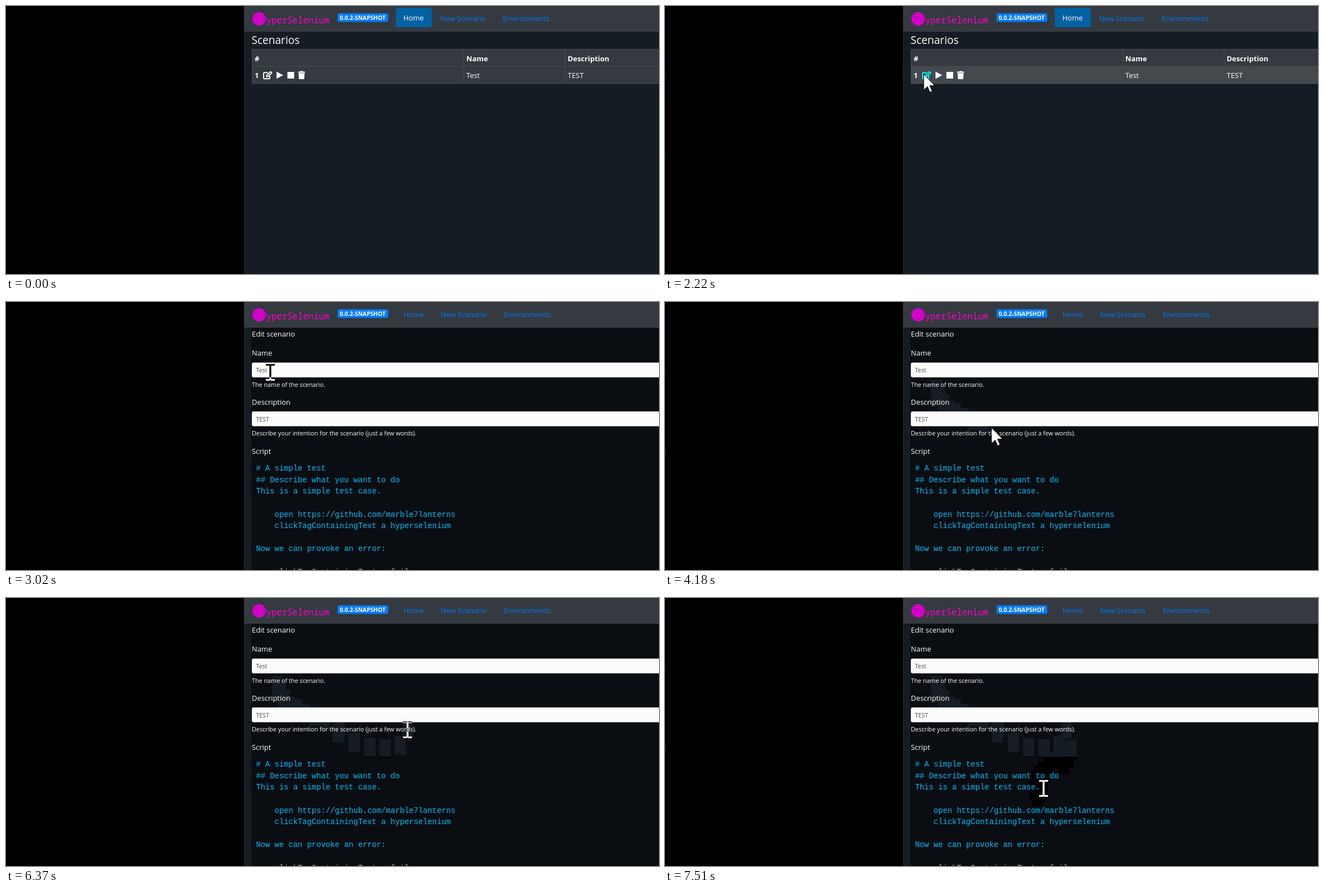
An HTML page that plays this animation: 1166x480 px, repeating every 8 s.

```html
<!DOCTYPE html>
<html lang="en">
<head>
<meta charset="utf-8">
<title>Scenario editor</title>
<style>
  html, body { margin: 0; width: 100%; height: 100%; overflow: hidden; background: #000; }
  svg { display: block; width: 100%; height: 100%; }
  text { font: 12.9px "Open Sans", "Noto Sans", sans-serif; fill: #fff; white-space: pre; }
  .bold { font-weight: 700; }
  .title { font-size: 19.1px; }
  .badge { font-size: 10.3px; font-weight: 700; }
  .brand { font: 15.7px "Noto Sans Mono", monospace; fill: #f0c; }
  .link { fill: #007bff; }
  .input { font-size: 10.6px; fill: #495057; }
  .help { font-size: 10.8px; }
  .code { font: 13.8px "Liberation Mono", monospace; fill: #00bfff; }
  .code:last-child { fill: #aab; }
  .line { stroke: #454d55; fill: none; }
  #beam { mix-blend-mode: difference; fill: #fff; }
</style>
</head>
<body>
<svg viewBox="0 0 1166 480">
  <defs>
    <!-- Pointer trail: slate over the form, black over the script area -->
    <linearGradient id="trailFill" gradientUnits="userSpaceOnUse" x1="0" y1="0" x2="0" y2="480">
      <stop offset=".592" stop-color="#161c23"/>
      <stop offset=".592" stop-color="#000"/>
    </linearGradient>
  </defs>
  <rect width="1166" height="480"/>
  <rect x="425" width="741" height="480" fill="#161c23"/>
  <path d="M0 127h1v2H0zM0 268h1v2H0z" fill="#a00c1c"/>
  <rect x="425" width="741" height="46" fill="#343a40"/>
  <path d="M425.5 46V480" stroke="#2b3035"/>
  <circle cx="452" cy="23" r="12" fill="#d400c8"/>
  <text class="brand" x="464.5" y="31">yperSelenium</text>
  <rect x="592" y="13" width="90.5" height="15.5" rx="3" fill="#007bff"/>
  <text class="badge" x="596" y="24.6">0.0.2-SNAPSHOT</text>

  <g id="list">
    <rect x="696" y="3.5" width="64.5" height="34.5" rx="3" fill="#0062a3"/>
    <text x="709.5" y="26">Home</text>
    <text class="link" x="775" y="26.5">New Scenario</text>
    <text class="link" x="887" y="26.5">Environments</text>
    <text class="title" x="438.5" y="67.5">Scenarios</text>
    <rect x="439" y="77" width="727" height="62" fill="#343a40"/>
    <rect id="row" x="439" y="108" width="727" height="31" fill="#45494d"/>
    <path class="line" d="M1166 77.5H439.5V139H1166M439 108H1166M817.5 78V139M998.5 78V139"/>
    <text class="bold" x="444" y="99">#</text>
    <text class="bold" x="822" y="99">Name</text>
    <text class="bold" x="1003" y="99">Description</text>
    <text class="bold" x="444" y="129">1</text>
    <text x="822" y="129">Test</text>
    <text x="1003" y="129">TEST</text>
    <g id="edit" stroke="#fff" fill="none" stroke-width="1.9">
      <path d="M467.5 119.3H461.5Q460 119.3 460 121V128.7Q460 130.3 461.6 130.3H469.4Q471 130.3 471 128.7V125"/>
      <path d="M465.3 126.6L465.8 123.8L472.4 117.5L474.6 119.7L468 126.2Z"/>
    </g>
    <path d="M483 117.5V130.5L495 124Z M502.5 118H514.5V130H502.5Z M521.5 117.5H525L526 116.5H529.5L530.5 117.5H534V119.5H521.5Z M522.3 120.3H533.2L532.4 131H523.2Z" fill="#fff"/>
  </g>

  <g id="form">
    <text class="link" x="710" y="26.5">Home</text>
    <text class="link" x="776.5" y="26.5">New Scenario</text>
    <text class="link" x="889" y="26.5">Environments</text>
    <rect x="438" y="46" width="728" height="434" fill="#0a0d11"/>
    <g id="trail" fill="url(#trailFill)"></g>
    <rect x="439" y="108.5" width="740" height="26.5" rx="3" fill="#fbfbfb"/>
    <rect x="439" y="196" width="740" height="26.5" rx="3" fill="#fbfbfb"/>
    <text x="439" y="62">Edit scenario</text>
    <text x="439" y="96">Name</text>
    <text class="input" x="446.5" y="126.3">Test</text>
    <text class="help" x="439" y="151.5">The name of the scenario.</text>
    <text x="439" y="184">Description</text>
    <text class="input" x="446.5" y="214">TEST</text>
    <text class="help" x="439" y="239.3">Describe your intention for the scenario (just a few words).</text>
    <text x="439" y="272">Script</text>
    <g id="script"></g>
  </g>

  <path id="arrow" d="M0 0V28.5L6.6 22.3L11 32.5L15.2 30.7L10.8 20.6H19.7Z" fill="#fff" stroke="#000"/>
  <path id="beam" d="M-8 -15H-1.5L0 -14L1.5 -15H8V-12H1.7V12H8V15H1.5L0 14L-1.5 15H-8V12H-1.7V-12H-8Z"/>
</svg>
<script>
const LOOP = 8000, STEP = 70, FORM_AT = 3020, TRAIL_AT = 3570;
const $ = id => document.getElementById(id);
const make = (parent, tag, attrs) => {
  const el = document.createElementNS("http://www.w3.org/2000/svg", tag);
  for (const k in attrs) el.setAttribute(k, attrs[k]);
  return parent.appendChild(el);
};
const show = (el, on) => el.style.display = on ? "" : "none";

const script = `# A simple test
## Describe what you want to do
This is a simple test case.

    open https://github.com/marble7lanterns
    clickTagContainingText a hyperselenium

Now we can provoke an error:

    clickTagContainingText a failure`;
script.split("\n").forEach((line, i) => {
  make($("script"), "text", { class: "code", x: 446.5, y: 302 + i * 20.63 }).textContent = line;
});

// Pointer moves: start, end, then the control points of a Bezier curve
const moves = [
  [950, 1370, [854, 400], [620, 270], [483, 184]],
  [1890, 2070, [483, 184], [462, 122]],
  [2220, 2460, [462, 122], [470, 125]],
  [FORM_AT, FORM_AT, [472, 126]],
  [3500, 4180, [472, 126], [482, 195], [583, 225]],
  [4180, 4340, [583, 225], [612, 242]],
  [4370, 4640, [612, 242], [665, 267], [717, 236]],
  [6370, 7120, [717, 236], [717, 310], [640, 300], [664, 357]],
  [7200, 7510, [664, 357], [676, 341]]
];

const bezier = (pts, u) => pts.length === 1 ? pts[0] : bezier(
  pts.slice(1).map(([x, y], i) => [pts[i][0] + (x - pts[i][0]) * u, pts[i][1] + (y - pts[i][1]) * u]), u);

// Inputs, help text and the script area turn the arrow into a text beam
const textBands = [[108, 135], [196, 222.5], [229, 241], [284, 480]];

function pointer(t) {
  const move = moves.findLast(m => m[0] <= t);
  if (!move) return null;
  const [start, end, ...pts] = move;
  const u = t >= end ? 1 : Math.floor((t - start) / STEP) * STEP / (end - start);
  const [x, y] = bezier(pts, u);
  return { x, y, beam: t >= FORM_AT && textBands.some(([top, bottom]) => y > top && y < bottom) };
}

// Every place the pointer has covered stays repainted
const trail = [];
for (let t = TRAIL_AT; t < LOOP; t += STEP / 2) {
  const { x, y, beam } = pointer(t);
  const box = beam ? { x: x - 9, y: y - 15, width: 18, height: 31 } : { x, y, width: 20, height: 34 };
  trail.push({ t, el: make($("trail"), "rect", box) });
}

function draw(t) {
  const p = pointer(t);
  show($("list"), t < FORM_AT);
  show($("form"), t >= FORM_AT);
  show($("row"), t >= 2010);
  $("edit").setAttribute("stroke", t >= 2060 ? "#0ff" : "#fff");
  trail.forEach(r => show(r.el, t >= r.t));
  show($("arrow"), p && !p.beam);
  show($("beam"), p && p.beam);
  if (p) $(p.beam ? "beam" : "arrow").setAttribute("transform", `translate(${p.x} ${p.y})`);
}

const start = performance.now();
function tick() {
  draw((performance.now() - start) % LOOP);
  requestAnimationFrame(tick);
}
tick();
</script>
</body>
</html>
```
